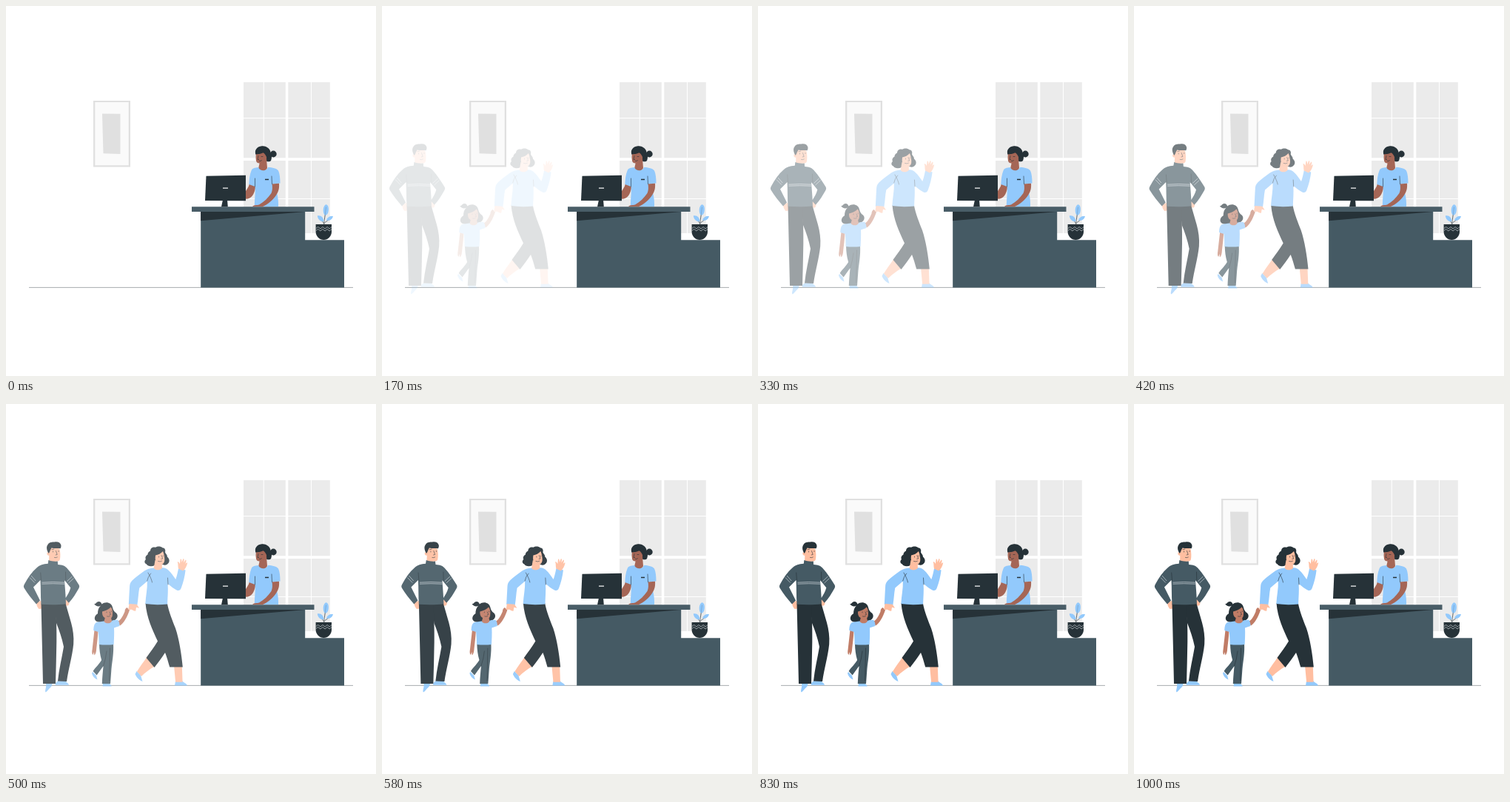
Animation, 500 px wide and 500 px high, one loop 1.04 s. Source, as an HTML page:

```html
<!DOCTYPE html>
<html lang="en">
<head>
<meta charset="utf-8">
<title>Reception desk</title>
<style>
  html, body { margin: 0; width: 100%; height: 100%; overflow: hidden; background: #fff; }
  svg { display: block; width: 100%; height: 100%; }
  .dark { fill: #263238; }
  .slate { fill: #455a64; }
  .blue { fill: #92c9fc; }
  .fair { fill: #ffbea0; }
  .tan { fill: #c07c66; }
  .brown { fill: #a56656; }
  .ink { fill: none; stroke: #263238; stroke-width: .6; stroke-linecap: round; stroke-linejoin: round; }
  .pale { fill: none; stroke: #e4eaee; stroke-width: .6; }
  .pane { fill: #ebebeb; }
</style>
</head>
<body>
<svg viewBox="0 0 500 500">
  <g id="window"></g>

  <g id="picture">
    <path fill="#e0e0e0" d="M118 128h50v89.500h-50z"/>
    <path fill="#fafafa" d="M120.300 130h45.400v85.200h-45.400z"/>
    <path fill="#e0e0e0" d="M130 145.500l24.500 .2v54.300l-23-.7z"/>
  </g>

  <path d="M31 380.400H469" stroke="#263238" stroke-opacity=".5" stroke-width=".8"/>

  <g id="receptionist">
    <circle class="dark" cx="361.300" cy="200" r="4.400"/>
    <path class="dark" d="M337 199c-1-6 4-10 10-9.800 6 .3 10 4 10.800 9 1.700 3 1.500 7 .4 10.500-1.500 2-4 2-6 1z"/>
    <path class="brown" d="M342 208l10-2 1 13c-2 5-9 6-12 1l1.500-7z"/>
    <path class="brown" d="M338 199c-.6 4-.6 8 .2 11 1 2.500 4 3 7 2 4-1.500 7-4 7.500-9l-3-6c-4 1.500-8 2-11.700 2z"/>
    <path class="dark" d="M337 200.500c0-7 4-10.500 9-10.700 6 0 10 4 10.500 9l-4 7c-1-4-3-6.500-5-7.500-3 1.500-7 2.200-10.500 2.200z"/>
    <path class="brown" d="M329 240c-1 5-4 8-5.500 11l-1 9c2 1.500 7 .5 9.500-2.500 3-3 5-9 5.500-15.500z"/>
    <path class="blue" d="M341 218c-5 .4-8.500 1.500-9.500 4.500-2 5-3 12-3.200 18.500l8.200 3c1 8-1 19-.5 27h32c.5-10-1.500-22-7-30.500l9.500-1c0-7-.6-13-2.500-17-2-3-8-4.200-14-4.700-1 5-10 7-13 .2z"/>
    <path class="brown" d="M359.500 240.500l9.500-.8c.5 6-.5 11-4 16-4 6-11 12.500-18 15.300h-14c2-2.500 6-1.500 9-2.500 7-4 12-9 16.500-15.500 1.700-4 1.700-8 1-12.500z"/>
    <path class="dark" d="M350 233.700h5v1.500h-5z"/>
    <path class="ink" d="M336.500 233v11M359 230l.5 10.500M341 202.500l-1 5h1.500M342.500 209.500q2 .3 3-.8M345 203.500h2"/>
  </g>

  <g id="desk">
    <path class="slate" d="M263.200 278h141v38.300h52.800v64.200H263.200z"/>
    <path class="dark" d="M263.200 278h141l-141 12.300z"/>
    <path fill="#495d67" d="M251 271.200h165.500v6.800H251z"/>
    <path class="dark" d="M293 262h6l.8 9.200H291z"/>
    <path class="dark" d="M270.500 229.800l53.500-1v34.400l-55-.2z"/>
    <path fill="#fff" d="M293 245.500h7v1.200h-7z"/>
  </g>

  <g id="plant">
    <path class="ink" d="M429.500 295q1-9 3-20M430 294l-7-8M430.500 293l8-6"/>
    <ellipse class="blue" cx="432.300" cy="275.500" rx="3.600" ry="7.300" transform="rotate(4 432.300 275.500)"/>
    <path class="blue" d="M429.500 291c-5 1-8-3-8.700-7.500 5-1 8 2 8.700 7.500zM433 289.500c1-4 4.500-6 9-5.500-1 4.500-4.500 6.500-9 5.500z"/>
    <path class="ink" style="stroke-width:.4;opacity:.5" d="M430.500 288l2-16"/>
    <path class="dark" d="M418.600 295h21.400v10a10.700 11 0 0 1-21.400 0z"/>
    <path class="pale" d="M419 300.500l2.600-2 3.300 2.500 3-2.500 3.200 2.500 3-2.500 3 2.500 2.800-2.200M419 303.500l2.600-2 3.300 2.500 3-2.500 3.200 2.500 3-2.500 3 2.500 2.800-2.200"/>
  </g>

  <g id="family" opacity="0">
    <g id="man">
      <path class="blue" d="M58 378h8.500c0 3-2 5-4 6.500-1.500 2-3.500 4.500-5 5-1.500-2 1.500-7 .5-11.500zM74 374.500l10-.3c2 2.300 4 2.300 5 5.500H70.500c0-2.500 1.500-4 3.500-5.200z"/>
      <path class="fair" d="M45 268l6-2c2 2 3 6 2 10.500l-4.500 .5c-2-2-3.500-5-3.500-9zM84 262.500l5 4c1 2 .6 4-1 6h-5z"/>
      <path class="dark" d="M69 269.500h15.500c2.500 9 5 17 7.500 26 2.500 9 4 19 3.200 29-1.700 17-6.700 33-9.200 50.500l-12-.5c1.500-16 5.500-31 8-46.500-2.500-12-6-22-10-32z"/>
      <path class="dark" d="M51.500 269.500H71c1 17 1.500 35 1.300 52-.3 19-.8 38-1.300 56.500H54c-.8-36-1.600-72-2.500-108.500z"/>
      <path class="slate" d="M61.500 212.500l12 .5c.5 2 .6 3 .6 4 6 .6 9 1.200 12 4.500 7 7.500 12 16 16.500 23 .8 1.500 .7 3-.3 4.700-4 7-7.500 13-13.500 19.500l-4.800-5.500c3-5 6-9.500 7.300-15-3-4-5.500-7-8.300-10 .8 11 1.800 21 2 32-11 1.500-23 1.200-33.500 .6-.8-11-.4-22-1-32.800l-9.500 9.500c3 6 6 12 9 18l-5 5c-6-7-11.800-14-16.300-21.500-1.200-2-1-3.600 .2-5.500 4.500-8.500 10-16.500 17-22.500 4-3.500 8-5 14.800-5.300z"/>
      <path class="fair" d="M61 197c1-3 13-4 15.500-1 1 5 1.200 10 .3 14.500-1 3-7 2.500-9.800 1.500-3-1-4.500-4-4.500-7.500-3 1-4.500-3.500-1.500-4.500z"/>
      <path class="fair" d="M62.500 202l8 8v3h-8.500z"/>
      <path class="slate" d="M61.300 211c4 1.500 8 2 12.300 1.500v4.500H61z"/>
      <path class="dark" d="M61.700 202l-1.500-2.500c-1.700-4-1.500-7 .3-9.500 2-3.500 6-3.500 9-3.500 4-1 8 .5 8.800 4 .5 2 0 3.500-.8 4.800-4-.6-8 .2-12-.8-.8 2-2 3-2.300 5z"/>
      <path class="pale" d="M52.500 241.200q15-1.200 30.500 0M52.500 243.200q15-1 30.500 0M36 234.500l6.800 7M38 232l6.200 7M86.500 239.500l7-6.500M88.500 242l7-6.500"/>
      <path class="ink" d="M50.700 228l.8 10.500M84.500 227l.3 11.500M71.500 198.500l1.700 5-2 .4M69.500 207.500q2 .7 3.800-.5M67.500 199v1M75 198.500v1M66 196.700l2.800-.6"/>
    </g>

    <g id="girl">
      <path class="blue" d="M121 362l5 5 1.500 5.500c-4-1.500-6.700-5-7.500-8.500zM135 377h8.500c.5 2 2.500 2 3.200 4.500H134.500z"/>
      <path class="slate" d="M130 323.500h19c.8 13-1.500 24-2.500 34l-1.500 20.500H133.800c.3-9 1-16 1.800-24l-9 12.500-5-5.500c4-6 9-10 11.500-15-2-7-3-14-3.100-22.500z"/>
      <path class="ink" d="M140 334q-1 10-4.400 20M144.500 330l-.8 44"/>
      <path class="tan" d="M123.500 305.500l5 1c-.5 9-1.500 17-2.300 24-.2 4-1 7.500-2.700 9-.5-1.500-.3-3-.5-4.500l-1.500 4c-1.500-1.500-1.500-4-.9-7.500zM154 294c3 0 7-5 10.500-13.500 0-2.500 1-4.500 3-5.500l3.500 3.500c-3 9-7.500 17.500-13 21z"/>
      <path class="dark" d="M132 272.500c-3 2-7 .5-8.800-2.500 3 .5 2.800-3 6-3 2-.2 4 1.500 4.200 3.500 5-4 13-2.500 14.500 4 1 4 2 6 5 8 3.500 3 1.500 9-2.800 9.700-7 3-16 4-22.600 2-5-1.500-5-8 .5-11 0-4 1-8 4-10.700z"/>
      <path class="blue" d="M136 293.500l11-.8c3-.5 5.500-1 8.300-.8 1.800 2 2.300 5 2.100 8l-7.400 2.500c.4 8 0 15-.4 22.600-7 .9-14 .7-20 0 0-6-.3-11-.8-17l-6.500-2c0-5 1-9.500 4-11z"/>
      <path class="tan" d="M138.500 286h7l1.500 7.500c-2 3.500-8 4-10.500 .4z"/>
      <path class="tan" d="M134 280.500c4.500-1 9-3 11.700-6 2.300 2.500 2.800 7.500 2 12-.8 4.200-6 4.800-9.200 3-3.500-1.600-4.700-4.500-4.500-9z"/>
      <path class="ink" d="M144 281l1.500 3.500-1.500 .3M140.500 287q2 .8 3.800-.3M140 281v.8M146.300 280v.8"/>
    </g>

    <g id="woman">
      <path class="blue" d="M180.500 361l5.500 5.500 2.500 8.500c-4-1.500-8-5-10-10zM233 374.500l9.500-.3c1 2.500 5 2.500 6.500 6.300h-17z"/>
      <path class="fair" d="M195 341l9 14c-6 3.500-12 8-17 13l-6-6.500c4-7 9-13 14-20.500zM231 353.500h10.800l.8 22.300h-9.500z"/>
      <path class="dark" d="M192.500 269h29.300c2.500 13 7 23 11.200 34 5 15 8 34 9.800 52.500h-17.600c-2-7-3.700-13-6.200-19.500-5 7.500-9.500 13.500-14.500 20L193.500 343c5-7 11-15 15.500-22.500-7-15-15-32-16.500-51.500z"/>
      <path class="dark" d="M199 198.500c0-4 4-6 7-4.700 3-2 7.500-1.500 9.500 .5 3 0 4.500 3 3.500 6 1 2.500 3 3.500 3 6.500 3 2 3.500 6.500 1.200 8.500-1.500 2.500-5 3-7.200 1.700l-11 1c-4 2-9.500 1.500-11-1.500-3-1-3.500-4.500-1-6.500-1.500-3 .5-5.500 2.500-6.500 0-2 1-4 3.500-5z"/>
      <path class="blue" d="M203.500 221.500c-5 .5-9 1.500-12.500 4-6 4.500-12 8.500-16.500 13-2.500 2.500-3.200 5-3.400 8l-1.300 24.500 11.500 1c1.500-9 1.500-16 3-23.500l10.500-9c.5 10-2 20-2.500 30.600 10 1.300 20 1.300 29.800 .4 .3-10 1.200-18 .5-27.500 4 3 8 6.500 12 8.500 3 1.500 5 0 6-2.500 3-8 5-16 6-24.500l-9.500-2.500c-1 5-2 10-3.800 15-3-4.500-6-9-10-12.500-1.500-2-4.500-3-7.500-3.300z"/>
      <path class="fair" d="M205.500 211l9 4 .5 6.500c-2 3.500-9 4-11.300 .2z"/>
      <path class="fair" d="M206 204.500c3.500-.5 7.500-2.500 10-5.500 1.700 4.500 2.700 9 2.200 13-.8 4.500-4.500 6.500-8 5-3-1.500-4.500-5-4.500-8.500z"/>
      <path class="fair" d="M237 222.500c-1-4 0-6-1.300-9 1-1 2.300 .6 3.200 2.500l.8-6.500c1.400-.5 1.700 1 1.800 4.500l2-5c1.500 0 1.300 2 .5 5.500l2.700-4c1.500 .3 .8 2.500-.3 5.500 1-1.500 2.300-2 2.800-1.300-1 4.500-3 8.300-6 10.800zM170.500 270l10.300 .8c.7 2 2.500 3 3.200 5l-4-1-.8 5c-2.700 .2-4-1.500-5.500-2l-4.500 .3z"/>
      <path class="ink" d="M196 228q5 9 5.500 13M194.700 239q1-6 5-10M222.500 235l.5 9M214 204.500l1.700 4.500-2 .4M209.500 212.500q3 1.200 5-.3M210.500 206v1M216.300 205v1"/>
    </g>
  </g>
</svg>
<script>
  const LOOP = 1040;
  const FADE_STEPS = 17;
  const SLIDE_GAP = 4;
  const SLIDE = [-21, -18, -11, -4, 0, 1, 0];

  const family = document.getElementById('family');

  function addWindow() {
    const columns = [[321, 347.7], [348.8, 377.8], [381.3, 412], [413, 437.8]];
    const rows = [[103, 151], [152, 205.2], [209, 260], [261, 307]];
    document.getElementById('window').innerHTML = rows.map(([top, bottom]) =>
      columns.map(([left, right]) =>
        `<path class="pane" d="M${left} ${top}H${right}V${bottom}H${left}z"/>`).join('')).join('');
  }

  const smooth = u => u * u * (3 - 2 * u);

  // Catmull-Rom curve through evenly spaced keys
  function spline(keys, x) {
    const i = Math.min(Math.floor(x), keys.length - 2);
    const u = x - i;
    const key = n => keys[Math.max(0, Math.min(keys.length - 1, n))];
    const [a, b, c, d] = [key(i - 1), key(i), key(i + 1), key(i + 2)];
    return b + u / 2 * (c - a + u * (2 * a - 5 * b + 4 * c - d + u * (3 * (b - c) + d - a)));
  }

  // 24 steps per second, each starting on a multiple of 10 ms
  const stepAt = ms => Math.min(24, Math.floor((Math.floor(ms / 10) + 0.499) * 0.24));

  function draw(ms) {
    const step = stepAt(ms % LOOP);
    const x = spline(SLIDE, step / SLIDE_GAP);
    family.setAttribute('transform', `translate(${x.toFixed(2)} 0)`);
    family.setAttribute('opacity', smooth(Math.min(1, step / FADE_STEPS)).toFixed(3));
  }

  addWindow();
  let start;
  function tick(now) {
    start ??= now;
    draw(now - start);
    requestAnimationFrame(tick);
  }
  draw(0);
  requestAnimationFrame(tick);
</script>
</body>
</html>
```
